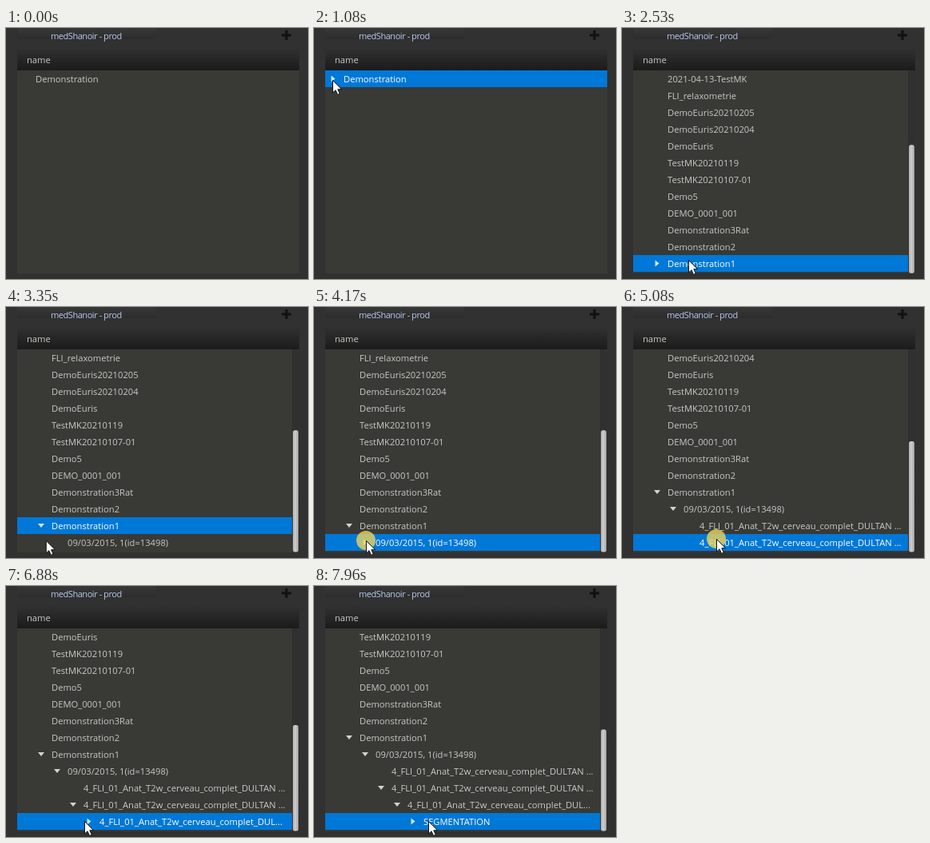
Write an HTML page that moves like this. It is 378 px wide and 314 px high and loops after 8 s.

```html
<!DOCTYPE html>
<html lang="en">
<head>
<meta charset="utf-8">
<title>Data tree</title>
<style>
html, body { margin: 0; width: 100%; height: 100%; overflow: hidden; background: #313131; }
svg { display: block; width: 100vw; height: 100vh; }
text { font: 11.2px "Open Sans", "Noto Sans", sans-serif; fill: #c6cbc6; white-space: pre; }
.tab { font-size: 11px; letter-spacing: -0.45px; fill: #b9c9ef; }
</style>
</head>
<body>
<svg viewBox="0 0 378 314">
  <defs>
    <linearGradient id="tab" x2="0" y2="1"><stop stop-color="#383838"/><stop offset="1" stop-color="#2c2c2c"/></linearGradient>
    <linearGradient id="head" x2="0" y2="1"><stop stop-color="#313131"/><stop offset="1" stop-color="#1b1b1b"/></linearGradient>
    <linearGradient id="thumb"><stop stop-color="#a9a9a9"/><stop offset=".45" stop-color="#cfcfcf"/><stop offset="1" stop-color="#a4a4a4"/></linearGradient>
    <clipPath id="view"><rect x="14" y="53" width="353" height="253"/></clipPath>
  </defs>
  <rect width="378" height="314" fill="#313131"/>
  <rect x="14" width="174" height="14" fill="url(#tab)"/>
  <text class="tab" x="56" y="14">medShanoir - prod</text>
  <path d="M345 9h12M351 3v12" stroke="#111" stroke-width="3"/>
  <rect x="14" y="25" width="353" height="282" fill="#393936"/>
  <rect x="14" y="25" width="353" height="28" fill="url(#head)"/>
  <text x="26" y="44">name</text>
  <g id="rows" clip-path="url(#view)"></g>
  <g id="bar">
    <rect x="358" y="53" width="9" height="254" fill="#303030"/>
    <rect id="grip" x="359" width="7" rx="2.5" fill="url(#thumb)"/>
  </g>
  <circle id="press" r="12" fill="#ecd45c" opacity=".8"/>
  <path id="cursor" d="M.5 .5V16L4 12.7L6.6 18.4L9.3 17.2L6.8 11.7H11.6Z" fill="#fff" stroke="#111" stroke-width="1"/>
</svg>
<script>
const LOOP = 8000, TOP = 53, ROW = 21, VIEW = 253, NEVER = 1e9;
const $ = id => document.getElementById(id);

const scan = "4_FLI_01_Anat_T2w_cerveau_complet_";
const names = ["2021-06-08-TestMK", "2021-05-27-TestMK", "DemoEuris20210517", "TestMK20210506",
  "DemoEuris20210421", "2021-04-19-TestMK", "2021-04-13-TestMK", "FLI_relaxometrie",
  "DemoEuris20210205", "DemoEuris20210204", "DemoEuris", "TestMK20210119",
  "TestMK20210107-01", "Demo5", "DEMO_0001_001", "Demonstration3Rat", "Demonstration2"];

// depth, label, time added, time the arrow shows, time it opens
const item = (depth, label, born = 0, arrow = NEVER, open = NEVER) => ({ depth, label, born, arrow, open });
const items = [
  item(0, "Demonstration", 0, 870, 1350),
  ...names.map(n => item(1, n, 1350)),
  item(1, "Demonstration1", 1350, 2460, 3010),
  item(2, "09/03/2015, 1(id=13498)", 3010, 3700, 4240),
  item(3, scan + "DULTAN ...", 4240),
  item(3, scan + "DULTAN ...", 4240, 5220, 5640),
  item(4, scan + "DUL...", 5640, 6620, 7220),
  item(5, "SEGMENTATION", 7220, 7720)
];

// [time, value] steps
const scrolls = [[0, 0], [1750, 3], [1860, 6], [1960, 7], [3290, 8], [4450, 10], [5850, 11], [7360, 12]];
const picks = [[0, -1], [800, 0], [2400, 18], [3640, 19], [5050, 21], [6540, 22], [7640, 23]];
const presses = [[800, 920], [1280, 1410], [2400, 2480], [2880, 3010], [3640, 3750],
  [4060, 4230], [5010, 5150], [5570, 5700], [6540, 6650], [7080, 7200], [7640, 7740]];

// [time, x, y] of the pointer tip
const path = [[70, 262, 298], [600, 51, 58], [920, 51, 58], [1080, 23, 65], [1410, 23, 65],
  [2050, 129, 262], [2120, 126, 270], [2260, 118, 290], [2470, 118, 290], [2530, 83, 290],
  [2800, 43, 292], [3290, 43, 292], [3600, 110, 292], [3750, 110, 292], [3970, 65, 292],
  [4480, 65, 292], [4800, 112, 284], [4870, 114, 286], [5010, 118, 290], [5150, 118, 290],
  [5430, 84, 293], [5900, 84, 293], [6330, 135, 292], [6500, 140, 293], [6650, 140, 293],
  [6880, 98, 294], [7000, 103, 294], [7360, 103, 294], [7600, 160, 294], [7740, 160, 294], [7940, 143, 294]];

const stepAt = (list, t) => list.filter(s => s[0] <= t).pop()[1];

function pointAt(t) {
  const i = path.findIndex(p => p[0] > t);
  if (i < 0) return path[path.length - 1].slice(1);
  if (i === 0) return path[0].slice(1);
  const [a, b] = [path[i - 1], path[i]];
  const k = (t - a[0]) / (b[0] - a[0]), e = k * k * (3 - 2 * k);
  return [a[1] + (b[1] - a[1]) * e, a[2] + (b[2] - a[2]) * e];
}

function add(parent, tag, attrs) {
  const node = document.createElementNS("http://www.w3.org/2000/svg", tag);
  set(node, attrs);
  return parent.appendChild(node);
}
function set(node, attrs) {
  for (const k in attrs) node.setAttribute(k, attrs[k]);
}
const show = (node, on) => set(node, { display: on ? "inline" : "none" });

for (const it of items) {
  const x = 37 + 20 * it.depth;
  it.g = add($("rows"), "g", {});
  it.back = add(it.g, "rect", { x: 14, height: ROW, fill: "#0078d7" });
  it.mark = add(it.g, "path", { transform: `translate(${x - 13} 10.5)` });
  it.text = add(it.g, "text", { x, y: 15 });
  it.text.textContent = it.label;
}

function draw(t) {
  const count = items.filter(it => it.born <= t).length;
  const scroll = stepAt(scrolls, t), picked = stepAt(picks, t);
  const long = count * ROW > VIEW;

  items.forEach((it, i) => {
    const line = i - scroll, chosen = i === picked;
    const visible = it.born <= t && line >= 0 && line < 12;
    show(it.g, visible);
    if (!visible) return;
    set(it.g, { transform: `translate(0 ${TOP + ROW * line})` });
    show(it.back, chosen);
    set(it.back, { width: long ? 344 : 353 });
    show(it.mark, it.arrow <= t);
    set(it.mark, {
      d: it.open <= t ? "M-4 -2.5H4L0 2.5Z" : "M-2.5 -4V4L2.5 0Z",
      fill: chosen ? "#c9e9ff" : "#d2d2d2"
    });
    it.text.style.fill = chosen ? "#fff" : "";
  });

  show($("bar"), long);
  const scale = VIEW / (count * ROW);
  set($("grip"), { y: TOP + scroll * ROW * scale, height: VIEW * scale });

  const [x, y] = pointAt(t);
  show($("cursor"), t >= 70);
  set($("cursor"), { transform: `translate(${x} ${y})` });
  show($("press"), presses.some(([a, b]) => t >= a && t < b));
  set($("press"), { cx: x, cy: y });
}

const start = performance.now();
function tick() {
  draw((performance.now() - start) % LOOP);
  requestAnimationFrame(tick);
}
tick();
</script>
</body>
</html>
```
